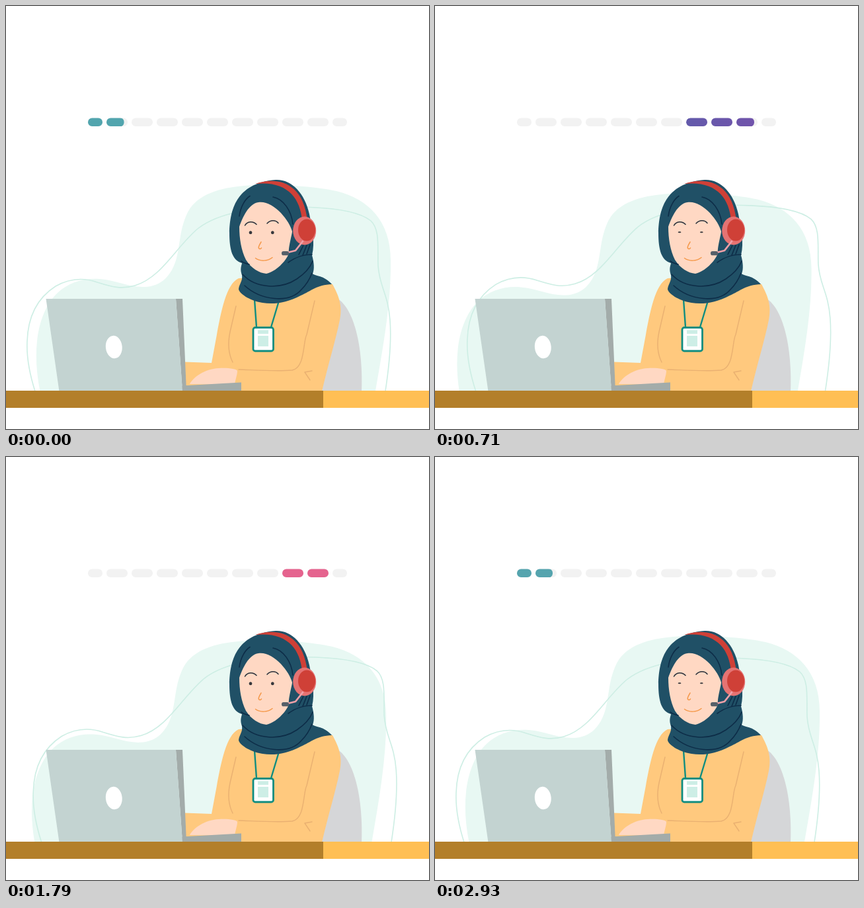
These frames come from a looping animation (640 by 640 pixels, 3000 ms). An HTML page with a canvas:

```html
<!DOCTYPE html>
<html lang="en">
<head>
<meta charset="utf-8">
<title>Support agent</title>
<style>
html, body { margin: 0; width: 100%; height: 100%; overflow: hidden; background: #fff; }
canvas { display: block; width: 640px; height: 640px; }
</style>
</head>
<body>
<canvas id="stage" width="640" height="640"></canvas>
<script>
const ctx = document.getElementById('stage').getContext('2d');
const LOOP = 3000;
const FRAME = LOOP / 42;

const clamp = (v, lo = 0, hi = 1) => Math.min(hi, Math.max(lo, v));
const sineEase = x => (1 - Math.cos(Math.PI * clamp(x))) / 2;

function fill(d, color) {
  ctx.fillStyle = color;
  ctx.fill(new Path2D(d));
}

function stroke(d, color, width) {
  ctx.strokeStyle = color;
  ctx.lineWidth = width;
  ctx.lineCap = ctx.lineJoin = 'round';
  ctx.stroke(new Path2D(d));
}

function ellipse(x, y, rx, ry, color, angle = 0) {
  ctx.fillStyle = color;
  ctx.beginPath();
  ctx.ellipse(x, y, rx, ry, angle, 0, Math.PI * 2);
  ctx.fill();
}

function rect(x, y, w, h, color) {
  ctx.fillStyle = color;
  ctx.fillRect(x, y, w, h);
}

function roundRect(x, y, w, h, r) {
  ctx.beginPath();
  ctx.roundRect(x, y, w, h, r);
}

function shifted(x, y, draw) {
  ctx.save();
  ctx.translate(x, y);
  draw();
  ctx.restore();
}

// Background shapes drift apart, then back, each way easing out.
function drift(t) {
  const half = LOOP / 2;
  const out = 1 - Math.pow(1 - (t % half) / half, 3.4);
  return t < half ? out : 1 - out;
}

function drawBackdrop(t) {
  const k = drift(t);
  ctx.save();
  ctx.beginPath();
  ctx.rect(0, 0, 640, 584);
  ctx.clip();
  shifted(-14 * k, 14 * k, () => fill(
    'M54 594C47 565 44 535 47 507C50 480 59 452 78 434C95 418 118 411 142 413' +
    'C168 415 186 426 210 425C236 424 250 407 257 385C264 362 262 338 275 312' +
    'C290 284 325 275 360 272C392 269 460 271 500 280C548 292 582 325 582 385' +
    'C583 450 570 520 557 594Z', '#e8f8f3'));
  shifted(19 * k, -3 * k, () => stroke(
    'M47 592C36 560 31 530 32 508C33 470 47 442 75 424C98 411 118 411 138 418' +
    'C160 425 175 429 195 423C235 411 256 366 290 337C320 313 380 301 460 304.5' +
    'C500 306 536 312 552 325C566 338 562 365 563 393C565 425 578 435 581 475' +
    'C584 515 577 565 572 595', '#cdeee4', 1.6));
  ctx.restore();
}

const ramp = [
  [0, 82, 165, 174], [430, 90, 133, 177], [714, 106, 87, 171],
  [1286, 169, 80, 127], [1786, 229, 99, 142], [2290, 240, 105, 154],
  [2940, 82, 165, 174], [LOOP, 82, 165, 174]
];

function rampColor(t) {
  const i = Math.max(1, ramp.findIndex(stop => stop[0] >= t));
  const a = ramp[i - 1], b = ramp[i];
  const k = (t - a[0]) / (b[0] - a[0]);
  return [1, 2, 3].map(c => a[c] + (b[c] - a[c]) * k);
}

const rgb = c => `rgb(${c.map(Math.round).join(',')})`;

function pillsPath() {
  ctx.beginPath();
  for (let i = 0; i < 11; i++) {
    const x = i ? 114 + 38 * i : 124;
    const w = i % 10 ? 32 : 22;
    ctx.roundRect(x, 169.5, w, 12.6, 6.2);
  }
}

function drawLoader(t) {
  const back = t >= 1500;
  const x = clamp(back ? (t - 1570) / 1074 : (t + 26) / 1004);
  const p = back ? 1 - sineEase(x) : sineEase(x);
  const stretch = clamp((x - 0.1) / 0.23) * (1 - sineEase((x - 0.75) / 0.25));
  const w = 57 + 46 * stretch;
  const left = 149.5 + 336 * p - w / 2;

  pillsPath();
  ctx.fillStyle = '#f2f2f2';
  ctx.fill();

  const color = rampColor(t);
  const spread = 7 * clamp(1 - Math.abs(t - 714) / 280);
  const paint = ctx.createLinearGradient(left, 0, left + w, 0);
  paint.addColorStop(0, rgb([color[0] - spread, color[1] + spread / 2, color[2]]));
  paint.addColorStop(1, rgb([color[0] + spread, color[1] - spread / 2, color[2]]));

  ctx.save();
  roundRect(left, 169, w, 13.6, 6.4);
  ctx.clip();
  pillsPath();
  ctx.fillStyle = paint;
  ctx.fill();
  ctx.restore();
}

function drawBody() {
  fill('M495 440C520 446 541 500 538 583L470 583Z', '#d5d6d8');
  fill('M352 412C333 420 325 465 319 497L311 540L270 538.5L270 583L478 583' +
    'C488 540 499 505 505 475C510 452 502 436 494 421L440 405Z', '#ffc97e');
  const seam = '#e9b071';
  stroke('M348 454L339 493C335 512 337 527 343 539', seam, 1.4);
  stroke('M467 446L455 497C449 508 453 547 433 551C410 553 380 551 352 550', seam, 1.4);
  stroke('M463 552L452 554L460 566', seam, 1.4);

  const teal = '#0f8d80';
  stroke('M376 444L379 486M413 446L401 486', teal, 2.4);
  roundRect(374, 486.5, 30.5, 35.5, 3);
  ctx.fillStyle = '#fff';
  ctx.fill();
  ctx.strokeStyle = teal;
  ctx.lineWidth = 2.8;
  ctx.stroke();
  rect(381, 490.5, 16, 5.5, '#cdeee6');
  rect(381, 499, 16, 16, '#cdeee6');
}

function drawHead(t) {
  fill('M408 263C432 262 452 283 459 315C463 335 468 358 463 377' +
    'C466 388 467 398 464 405C468 409 481 407 493 421C470 422 462 431 446 438' +
    'C425 449 405 452 388 449C368 446 352 434 352 428C353 420 360 414 356 404' +
    'C354 396 357 391 357 389C343 385 338 370 338 343C339 310 347 268 408 263Z', '#205066');
  fill('M382 297C367 299 358 320 353 334C353 352 356 370 363 384' +
    'C371 397 383 404 394 405C408 402 424 386 428 374C427 365 433 345 433 341' +
    'C429 325 405 294 382 297Z', '#ffd8c3');

  const fold = '#0d2c47';
  stroke('M353 318C355 303 362 292 369 287.5M404 289C420 292 432 310 434 330', fold, 1.6);
  stroke('M356 386C360 389 364 390 368 391M427 388C438 380 448 376 463 376', fold, 1.6);
  stroke('M358 406C378 428 416 429 440 413C452 405 460 396 464 386', fold, 1.6);
  stroke('M361 423C385 445 428 451 447 429C455 421 460 412 463 404', fold, 1.6);
  stroke('M443 376L450 362M449 377L455 362M455 375L460 361', fold, 1.6);

  const red = '#cf4037';
  fill('M377 269C405 259 449 262 456 324L448 324C445 290 425 264 377 269Z', red);
  ellipse(451.7, 340, 17.5, 21.5, '#e57373');
  ellipse(455, 339, 13, 16.5, red);
  stroke('M449 356L438 370L426 373', '#f0a0a8', 2.8);
  roundRect(417, 371, 11, 6.2, 2.8);
  ctx.fillStyle = '#566069';
  ctx.fill();

  stroke('M361.5 332C365 325.5 374 325 379 330.5M395 329C400 323.5 408 323.5 412 328.5', '#27303a', 1.5);
  const openness = clamp(Math.min(Math.abs(t - 675), Math.abs(t - 2885)) / 100, 0.28);
  for (const x of [370, 403.3]) ellipse(x, 342.8 - (1 - openness), 2.4, 2.5 * openness, '#38383c');
  stroke('M386 357C383 362 381 366 383 367C385 368 386 367 386.5 366', '#f59a4c', 1.5);
  stroke('M377.5 381.5C384 386.5 396 386.5 403 380.5', '#f59a4c', 1.5);
}

function drawDesk() {
  fill('M278 572C283 562 300 549 322 548C335 547 349 549 350 552C350 558 347 565 346 573Z', '#ffd8c3');
  fill('M266 574.5L356 569.5V583H266Z', '#a3acaa');
  fill('M257 443H267L273 583H267Z', '#a3acaa');
  fill('M60.5 443H257L267 583H80.5Z', '#c3d3d1');
  ellipse(163.3, 516, 12.4, 17.2, '#fff', -0.1);
  rect(0, 582, 480, 26, '#b37f2a');
  rect(480, 582, 160, 26, '#ffbf54');
}

function draw() {
  // Motion is stepped at 14 poses per second.
  const now = performance.now() % LOOP;
  const t = Math.floor((now + 5) / FRAME) * FRAME % LOOP;
  rect(0, 0, 640, 640, '#fff');
  drawLoader(t);
  drawBackdrop(t);
  drawBody();
  drawHead(t);
  drawDesk();
  requestAnimationFrame(draw);
}
draw();
</script>
</body>
</html>
```
